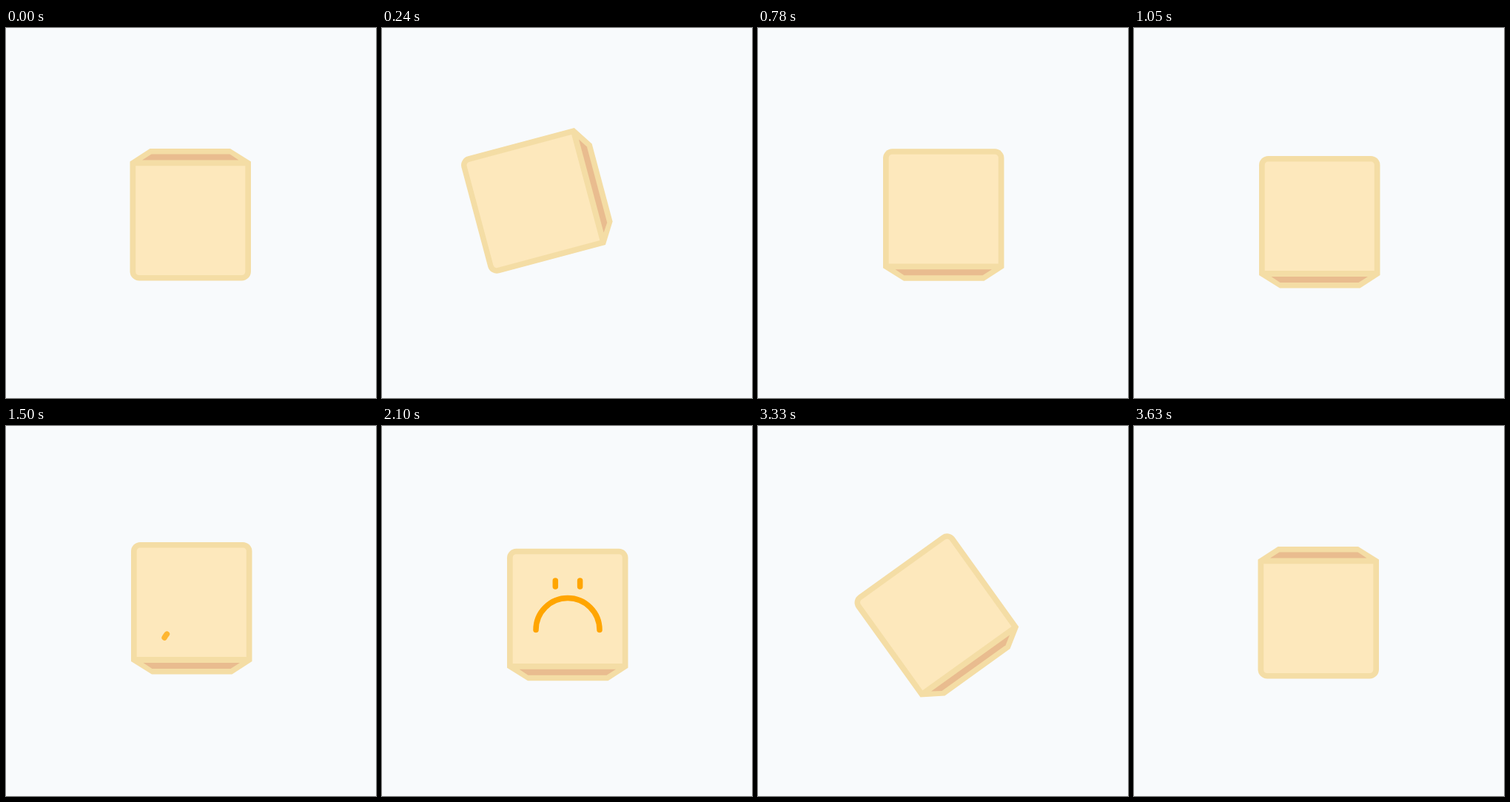
Recreate the animation shown at these times as an HTML page. Size 500x500 px, loop 4530 ms.

```html
<!DOCTYPE html>
<html lang="en">
<head>
<meta charset="utf-8">
<title>Empty box</title>
<style>
  html, body { margin: 0; width: 100%; height: 100%; overflow: hidden; background: #f8fafc; }
  svg { display: block; width: 100vw; height: 100vh; }
</style>
</head>
<body>
<svg viewBox="0 0 500 500">
  <g id="box">
    <path fill="#f4dda5" d="M-81 69.5V-79a12.5 12.5 0 0 1 12.5-12.5H70a12.5 12.5 0 0 1 12.5 12.5V69.5L55.5 87H-53Z"/>
    <path fill="#fde8bc" d="M-73.3 63.7V-79.5a4.5 4.5 0 0 1 4.5-4.5H70.3a4.5 4.5 0 0 1 4.5 4.5V63.7Z"/>
    <path fill="#e9bc8f" d="M-64.5 71.5H66L53.5 79.5H-52.5Z"/>
    <g id="face" fill="none" stroke="#ffa500" stroke-width="7.5" stroke-linecap="round">
      <path id="mouth" pathLength="100" d="M-42 18.2a43 43 0 0 1 86 0"/>
      <path id="eyes" d="M-15.7-48.2v8M17.6-48.2v8"/>
    </g>
  </g>
</svg>
<script>
  const STEP = 30, LOOP = 4530, LAST = 121;
  const [box, face, mouth, eyes] = ["box", "face", "mouth", "eyes"].map(id => document.getElementById(id));

  // Smooth rise from 0 to 1 between steps a and b.
  function rise(n, a, b) {
    const u = Math.min(1, Math.max(0, (n - a) / (b - a)));
    return u * u * (3 - 2 * u);
  }
  // Up to 1 at the peak, then back to 0.
  const bump = (n, a, peak, b) => rise(n, a, peak) - rise(n, peak, b);

  function drawBox(n) {
    const back = rise(n, 107, LAST);
    const flip = rise(n, 0, 18) - back;
    const hop = bump(n, 0, 6, 18);
    const shake = 12.5 * bump(n, 18, 28, 37) + 18.5 * bump(n, 37, 43, 95);
    const x = 250 - 39 * hop - 9 * Math.sin(Math.PI * back);
    const y = 250 + 16 * flip - 28 * hop ** 2 - shake + 20 * bump(n, 111, 117, LAST);
    box.setAttribute("transform", `translate(${x} ${y}) rotate(${180 * flip - 180})`);
  }

  function drawFace(n) {
    const grow = rise(n, 48, 64);
    const start = 18 * (1 - grow), end = 18 + 82 * grow;
    face.setAttribute("opacity", rise(n, 48, 51) - rise(n, 99, 107));
    mouth.setAttribute("transform", `translate(0 ${42 * (1 - rise(n, 49, 64))})`);
    mouth.setAttribute("stroke-dasharray", `${end - start} 200`);
    mouth.setAttribute("stroke-dashoffset", -start);
    eyes.setAttribute("opacity", rise(n, 56, 64));
  }

  const origin = performance.now();
  function tick() {
    const n = Math.min(LAST, Math.floor((performance.now() - origin) % LOOP / STEP));
    drawBox(n);
    drawFace(n);
    requestAnimationFrame(tick);
  }
  tick();
</script>
</body>
</html>
```
